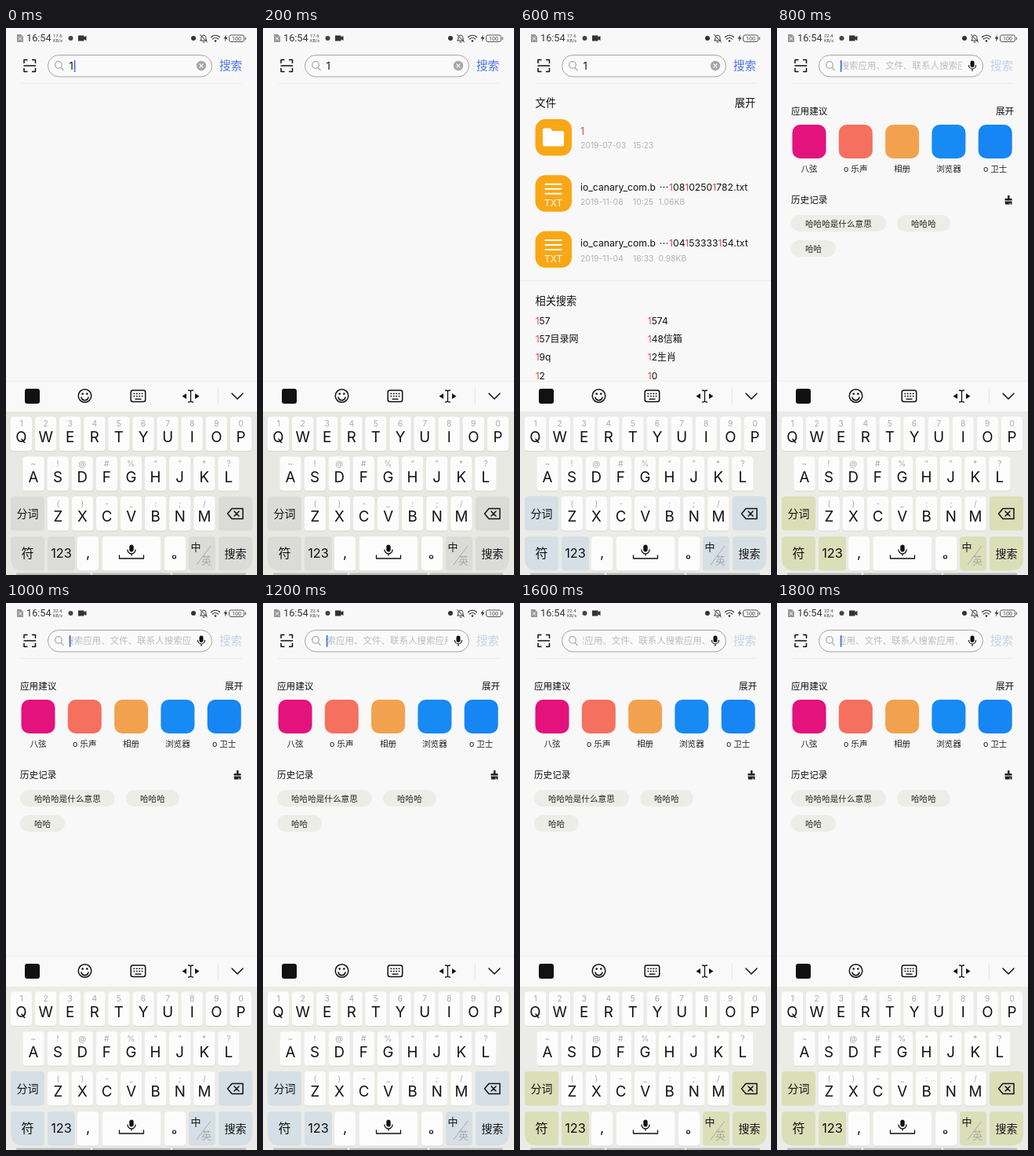
These frames come from a looping animation (320x696 px, 2000 ms). An HTML page:

```html
<!DOCTYPE html>
<html lang="zh-CN">
<head>
<meta charset="utf-8">
<title>Phone search</title>
<style>
html, body { margin: 0; width: 100%; height: 100%; overflow: hidden; background: #f8f8f8; }
svg { display: block; width: 100vw; height: 100vh; }
text { font-family: Inter, 'Noto Sans CJK SC', 'Noto Sans CJK', sans-serif; white-space: pre; }
.line { fill: none; stroke: #111; stroke-width: 1.5; stroke-linecap: round; stroke-linejoin: round; }
</style>
</head>
<body>
<svg id="stage" viewBox="0 0 320 696">
  <defs><clipPath id="field"><rect x="80" y="36" width="156" height="24"/></clipPath></defs>
  <rect width="320" height="696" fill="#f8f8f8"/>

  <g id="status">
    <path d="M14 8h5l3 3v7h-8z" fill="#999"/>
    <path d="M16 11.5l4 4m0-4l-4 4" stroke="#fff"/>
    <circle cx="82.500" cy="13" r="3" fill="#444"/>
    <path d="M92 9.500h7.500v2l3-1.500v6l-3-1.500v2H92z" fill="#333"/>
    <circle cx="239" cy="13" r="3" fill="#333"/>
    <path class="line" d="M248 16h8c-1.300-1-1-3-1.200-4.500a2.900 2.900 0 0 0-5.700 0c-.2 1.500 0 3.500-1.100 4.500M251 18h2M247.500 8.500l9 9.500" style="stroke:#333;stroke-width:1"/>
    <path class="line" d="M261.500 11.500q5.500-4.500 11 0M263.500 14q3.500-3 7 0" style="stroke:#333;stroke-width:1.200"/>
    <circle cx="267" cy="16.500" r="1.300" fill="#333"/>
    <path d="M281 8.500l-3.500 5h2.300l-1 4 3.700-5.500h-2.300z" fill="#333"/>
    <rect x="284.500" y="9" width="19" height="8.500" rx="2.500" fill="none" stroke="#555"/>
    <path d="M305.500 11.500v3.500" stroke="#555"/>
  </g>

  <g id="bar">
    <path class="line" d="M23 45v-4.500h4.500M33 40.500h4.500V45M37.500 51v4.500H33M27.500 55.500H23V51M22.500 48h15.500" style="stroke-linecap:butt"/>
    <rect x="53.500" y="34.500" width="209" height="27.500" rx="13.750" fill="#fafafa" stroke="#a3a3a3"/>
    <circle cx="67" cy="47" r="4.300" fill="none" stroke="#aaa" stroke-width="1.300"/>
    <path d="M70 50.500l3.500 3.500" stroke="#aaa" stroke-width="1.300"/>
    <path d="M19 70.500H301" stroke="#ededed"/>
  </g>

  <g id="typed">
    <circle cx="249" cy="48" r="6.200" fill="#a8a8a8"/>
    <path d="M246.700 45.700l4.600 4.600m0-4.600l-4.600 4.600" stroke="#fff" stroke-width="1.200"/>
  </g>

  <g id="empty">
    <g clip-path="url(#field)"><g id="hint"></g></g>
    <rect x="246.500" y="41.500" width="5" height="8.500" rx="2.500" fill="#111"/>
    <path class="line" d="M244.500 47.500a4.500 4.500 0 0 0 9 0M249 52v2.500" style="stroke-width:1.200"/>
  </g>
  <rect id="caret" y="41" width="1.600" height="15" fill="#3d6fe0"/>

  <g id="results"><path d="M0 321.500H320" stroke="#ececec"/></g>

  <g id="home">
    <path d="M294 213h2.500v4h3v2.500h-9V217h3.500zM290.500 220.500h9v4h-2v-2h-1v2h-5.500z" fill="#222"/>
  </g>

  <g id="tools">
    <rect y="449" width="320" height="39" fill="#f9f9f9"/>
    <path d="M0 449.500H320" stroke="#eeeee8"/>
    <rect x="24" y="459" width="19" height="19" rx="3" fill="#111"/>
    <circle class="line" cx="100.500" cy="468" r="8.300"/>
    <path class="line" d="M96 470a4.600 4.600 0 0 0 9 0"/>
    <circle cx="97.700" cy="465.500" r="1.200"/><circle cx="103.300" cy="465.500" r="1.200"/>
    <rect class="line" x="159.200" y="461" width="18.500" height="14.500" rx="2.500"/>
    <path d="M162.500 465.300h12M162.500 468.500h12" stroke="#111" stroke-width="1.600" stroke-dasharray="1.800 1.600"/>
    <path d="M164.500 472.200h8" stroke="#111" stroke-width="1.400"/>
    <path class="line" d="M232.500 461q3 0 3 1.500 0-1.500 3-1.500M235.500 462v12.500M232.500 476q3 0 3-1.500 0 1.500 3 1.500" style="stroke-width:1.300"/>
    <path d="M230 465v7l-5.500-3.500zM241 465v7l5.500-3.500z" fill="#111"/>
    <path d="M270.500 458v21" stroke="#e6e6e6"/>
    <path class="line" d="M288 465l7 7 7-7"/>
  </g>
  <g id="keys"></g>
</svg>

<script>
const $ = id => document.getElementById(id);
const NS = 'http://www.w3.org/2000/svg';
const RED = '#dd4b35', INK = '#111', PALE = '#b4b4b4';

function add(parent, tag, attrs, str) {
  const el = document.createElementNS(NS, tag);
  for (const k in attrs) el.setAttribute(k, attrs[k]);
  if (str) el.textContent = str;
  return parent.appendChild(el);
}
function label(parent, x, y, size, str, fill = INK, more = {}) {
  return add(parent, 'text', { x, y, 'font-size': size, fill, ...more }, str);
}
const mid = (p, x, y, size, str, fill, more) =>
  label(p, x, y, size, str, fill, { 'text-anchor': 'middle', ...more });
const box = (p, x, y, width, height, rx, fill) =>
  add(p, 'rect', { x, y, width, height, rx, fill });

// Text with the matched digit in red
function marked(p, x, y, size, str, all) {
  const el = label(p, x, y, size, '');
  str.split(/(1)/).forEach((s, i) => {
    if (s) add(el, 'tspan', { fill: s === '1' && (all || i === 1) ? RED : INK }, s);
  });
}

// Status and search bar
const roboto = { style: 'font-family:Roboto,sans-serif' };
label($('status'), 26, 17.3, 12.7, '16:54', '#333', roboto);
const speed = label($('status'), 60, 12, 6, '', '#444', roboto);
label($('status'), 60, 18, 5.5, 'KB/s', '#444', roboto);
mid($('status'), 294, 16, 7, '100', '#444', roboto);
const go = label($('bar'), 272, 53.3, 14.6, '搜索');
label($('typed'), 80.5, 52.7, 13, '1');
label($('hint'), 0, 52.3, 11.5, '搜索应用、文件、联系人'.repeat(2), '#b9bcc2');

// Search results
const res = $('results');
label(res, 19.5, 100, 13.3, '文件');
label(res, 273.7, 100, 13.3, '展开');
label(res, 19.5, 351.5, 13.2, '相关搜索');
for (let i = 0; i < 3; i++) {
  const y = 116 + i * 71.3;
  box(res, 19.5, y, 46.5, 46.5, 13, '#f9a716');
  if (i) {
    for (let k = 0; k < 3; k++) box(res, 31.5, y + 10.5 + k * 6, 22, 2, 1, '#fff');
    mid(res, 42.7, y + 39.5, 12, 'TXT', '#fff');
  } else {
    add(res, 'path', { d: 'M29 130q0-2.500 2.500-2.500h7l3 3.500h12q2.500 0 2.500 2.500v14.500q0 2.500-2.500 2.500h-22q-2.500 0-2.500-2.500z', fill: '#fff' });
  }
}
function stamp(y, ...parts) {
  parts.forEach((s, i) => label(res, [77, 144, 176.5][i], y, 10.4, s, PALE));
}
function file(y, digits) {
  label(res, 77, y, 12.2, 'io_canary_com.b');
  for (let i = 0; i < 3; i++) add(res, 'circle', { cx: 179.5 + i * 4, cy: y - 4, r: 0.8 });
  marked(res, 190, y, 12.2, digits + '.txt', true);
}
marked(res, 77, 136, 12.5, '1');
stamp(153, '2019-07-03', '15:23');
file(206.5, '108102501782');
stamp(225, '2019-11-08', '10:25', '1.06KB');
file(278, '104153333154');
stamp(296.5, '2019-11-04', '16:33', '0.98KB');
['157', '1574', '157目录网', '148信箱', '19q', '12生肖', '12', '10'].forEach((s, i) =>
  marked(res, i % 2 ? 162.8 : 19.7, 377 + (i >> 1) * 23.2, 12, s));

// Suggestions and history
const home = $('home'), semi = { 'font-weight': 500 };
label(home, 18, 110, 11.6, '应用建议', INK, semi);
label(home, 279, 110, 11.6, '展开', INK, semi);
label(home, 18, 223.3, 11.6, '历史记录', INK, semi);
[['八弦', '#e3127c'], ['o 乐声', '#f5705f'], ['相册', '#f2a24e'], ['浏览器', '#178af3'], ['o 卫士', '#1686f4']]
  .forEach(([name, fill], i) => {
    const x = 19.5 + i * 59.3;
    box(home, x, 123, 43, 43, 10, fill);
    mid(home, x + 21.5, 182.7, 10.6, name, '#222');
  });
[[18, 238, 121, '哈哈哈是什么意思'], [153, 238, 68, '哈哈哈'], [18, 270, 57, '哈哈']]
  .forEach(([x, y, w, s]) => {
    box(home, x, y, w, 21, 10.5, '#ecede7');
    label(home, x + 18, y + 14.6, 10.6, s, '#222');
  });

// Keyboard
const keys = $('keys');
const board = box(keys, 0, 488, 320, 208, 0);
const dark = add(keys, 'g', {});
const PITCH = 31.1;
function row(x, y, letters, hints) {
  [...letters].forEach((c, i) => {
    const cx = x + i * PITCH;
    box(keys, cx - 13.6, y + 1, 27.2, 43.5, 4, '#d9dad5');
    box(keys, cx - 13.6, y, 27.2, 43.5, 4, '#fcfcfc');
    mid(keys, cx, y + 12.7, 10.3, hints[i], '#aaa');
    mid(keys, cx, y + 32.3, 18.7, c);
  });
}
row(19.5, 494.5, 'QWERTYUIOP', '1234567890');
row(35, 545.3, 'ASDFGHJKL', '~!@#%“”*?');
row(66.3, 596, 'ZXCVBNM', '()-_:;/');
[[6, 596, 43], [271, 596, 43], [53, 647, 35], [233, 647, 34]].forEach(([x, y, w]) =>
  box(dark, x, y, w, 43.5, 4));
add(dark, 'path', { d: 'M10 647h35q4 0 4 4v35.500q0 4-4 4H22q-16 0-16-16V651q0-4 4-4z' });
add(dark, 'path', { d: 'M275 647h35q4 0 4 4v23.500q0 16-16 16h-23q-4 0-4-4V651q0-4 4-4z' });
[[91, 27], [122.5, 75], [202, 27]].forEach(([x, w]) => {
  box(keys, x, 648, w, 43.5, 4, '#d9dad5');
  box(keys, x, 647, w, 43.5, 4, '#fcfcfc');
});
mid(keys, 27.5, 623.3, 14, '分词');
mid(keys, 27.5, 674, 16, '符');
mid(keys, 70.5, 674, 16.3, '123');
mid(keys, 104.7, 674, 18, ',');
add(keys, 'circle', { class: 'line', cx: 214.5, cy: 673, r: 2, style: 'stroke-width:1.2' });
mid(keys, 292.5, 673.5, 14, '搜索');
mid(keys, 242, 665.3, 13, '中', INK, semi);
mid(keys, 255.5, 682, 13, '英', '#aaa');
add(keys, 'path', { d: 'M243 683L261 659', stroke: '#aaa' });
add(keys, 'path', { class: 'line', d: 'M282.500 618l5.500-6.500h14v13h-14zM291 615l6 6m0-6l-6 6' });
box(keys, 157.3, 657.5, 5.4, 9, 2.7, INK);
add(keys, 'path', { class: 'line', d: 'M155 664a5 5 0 0 0 10 0M160 669v2M144.500 671v4h31v-4', style: 'stroke-width:1.3' });
[[13, 95], [110, 100], [212, 94]].forEach(([x, w]) => box(keys, x, 693.5, w, 2.5, 1, '#bcbcbc'));

const show = (id, on) => $(id).setAttribute('display', on ? 'inline' : 'none');
const GREY = '#dbdbd8', BLUE = '#d5dfe5', LIME = '#dbdfb8';

function draw(ms) {
  const t = Math.floor(ms % 2000 / 200) * 200;
  const typed = t < 800;
  show('typed', typed);
  show('results', t >= 400 && typed);
  show('empty', !typed);
  show('home', !typed);
  show('caret', t < 200 || (t >= 800 && t < 1400) || t >= 1800);
  $('caret').setAttribute('x', typed ? 86.8 : 80.8);
  // Placeholder marquee, 26.7 px per second
  $('hint').setAttribute('transform', `translate(${80.6 - (t - 800) * 0.0267} 0)`);
  go.setAttribute('fill', typed ? '#4a76e6' : '#c3d3ee');
  speed.textContent = typed ? '17.6' : '22.4';
  const lime = t === 800 || t >= 1400;
  dark.setAttribute('fill', t < 400 ? GREY : lime ? LIME : BLUE);
  board.setAttribute('fill', t < 400 ? '#e8e8e2' : '#ebece7');
}
function tick(now) {
  draw(now);
  requestAnimationFrame(tick);
}
draw(0);
requestAnimationFrame(tick);
</script>
</body>
</html>
```
